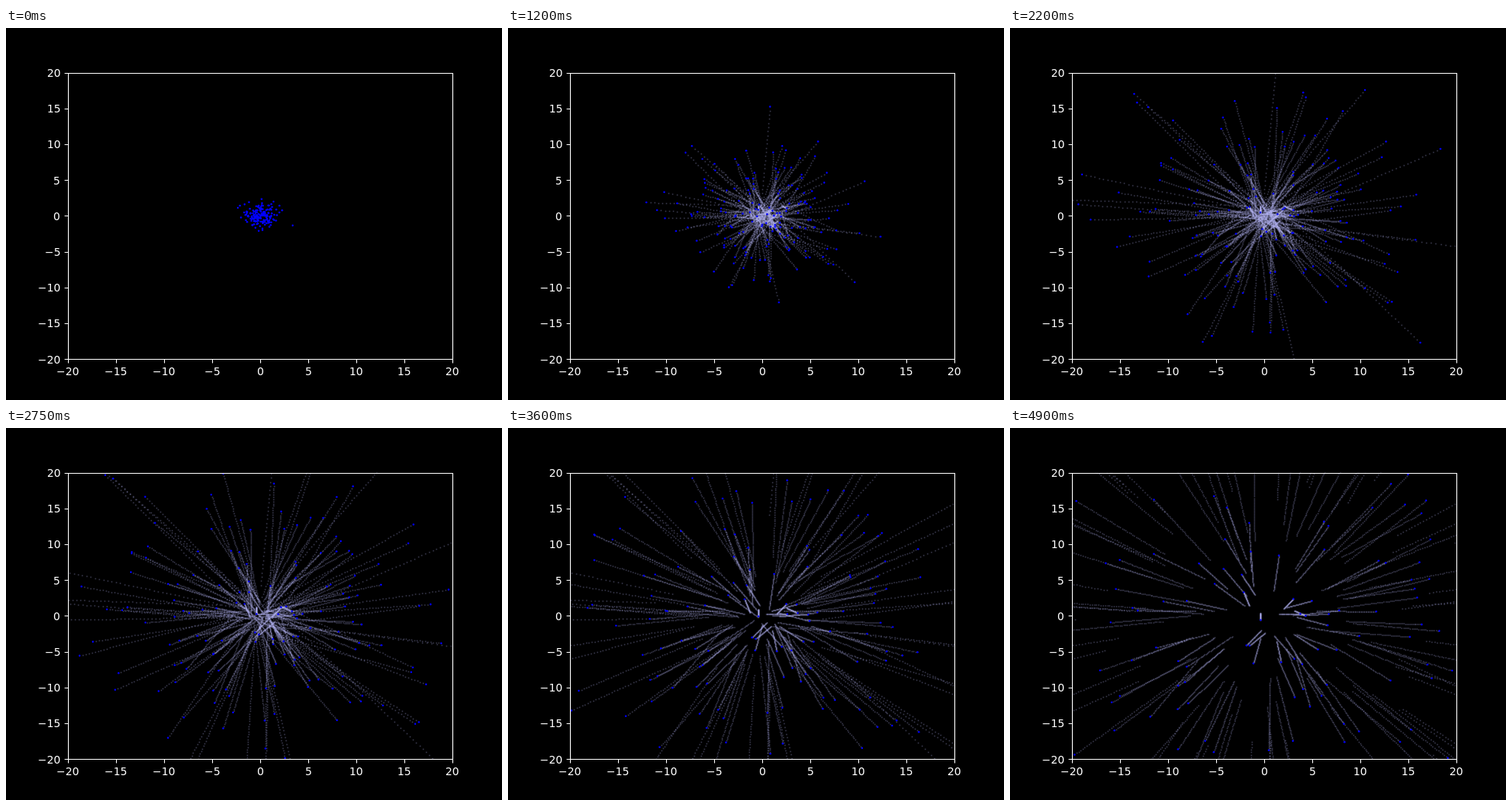
Animation of 640x480 px, one loop 4950 ms. Source, as an HTML page with a canvas:

```html
<!DOCTYPE html>
<html lang="en">
<head>
<meta charset="utf-8">
<title>Expanding particles</title>
<style>
  html, body { margin: 0; height: 100%; overflow: hidden; background: #000; }
  canvas { display: block; }
</style>
</head>
<body>
<canvas id="stage" width="640" height="480"></canvas>
<script>
const ctx = document.getElementById('stage').getContext('2d');
const FRAMES = 99, STEP = 50, TRAIL = 50;
const COUNT = 170, SPEED = 0.18, SPREAD = 0.75;
const LEFT = 80, TOP = 57.6, WIDTH = 496, HEIGHT = 369.6;

// Data coordinates run from -20 to 20 on both axes.
const toX = x => LEFT + (x + 20) / 40 * WIDTH;
const toY = y => TOP + (20 - y) / 40 * HEIGHT;
const snap = v => Math.floor(v + 0.5) + 0.5;

let seed = 7;
function random() {
  seed = (seed * 1664525 + 1013904223) % 4294967296;
  return (seed + 0.5) / 4294967296;
}
function gauss() {
  return Math.sqrt(-2 * Math.log(random())) * Math.cos(2 * Math.PI * random());
}

// Speeds follow evenly spaced quantiles of a two-dimensional normal distribution.
const particles = Array.from({ length: COUNT }, (_, i) => {
  const speed = SPEED * Math.sqrt(-2 * Math.log((i + 1) / (COUNT + 1)));
  const angle = 2 * Math.PI * random();
  const vx = speed * Math.cos(angle), vy = speed * Math.sin(angle);
  return { vx, vy, x: 2 * vx + SPREAD * gauss(), y: 2 * vy + SPREAD * gauss() };
});

function position(p, frame) {
  return [toX(p.x + p.vx * frame), toY(p.y + p.vy * frame)];
}

function drawParticles(frame) {
  ctx.save();
  ctx.beginPath();
  ctx.rect(LEFT, TOP, WIDTH, HEIGHT);
  ctx.clip();
  ctx.fillStyle = 'rgba(190, 190, 255, 0.3)';
  for (const p of particles) {
    for (let n = Math.max(0, frame - TRAIL); n < frame; n++) {
      const [x, y] = position(p, n);
      ctx.fillRect(snap(x) - 0.8, snap(y) - 0.8, 1.6, 1.6);
    }
  }
  ctx.fillStyle = '#00f';
  for (const p of particles) {
    ctx.beginPath();
    ctx.arc(...position(p, frame), 1.25, 0, 2 * Math.PI);
    ctx.fill();
  }
  ctx.restore();
}

// Text starts on a whole pixel; align is the share of its width left of x.
function drawLabel(text, x, baseline, align) {
  const width = ctx.measureText(text).width;
  ctx.fillText(text, Math.round(x - width * align), baseline);
}

function drawAxes() {
  ctx.strokeStyle = ctx.fillStyle = '#fff';
  ctx.lineWidth = 1.11;
  ctx.font = '13.89px "DejaVu Sans", sans-serif';
  ctx.beginPath();
  ctx.rect(80.5, 58.5, 496, 369);
  for (let value = -20; value <= 20; value += 5) {
    const x = toX(value), y = toY(value);
    const label = String(value).replace('-', '\u2212');
    ctx.moveTo(snap(x), 427.5);
    ctx.lineTo(snap(x), 432.4);
    ctx.moveTo(80.5, snap(y));
    ctx.lineTo(75.6, snap(y));
    drawLabel(label, x, 448, 0.5);
    drawLabel(label, 70.3, Math.round(y + 5.3), 1);
  }
  ctx.stroke();
}

let shown = -1;
function render() {
  const frame = Math.floor(performance.now() / STEP) % FRAMES;
  if (frame !== shown) {
    shown = frame;
    ctx.fillStyle = '#000';
    ctx.fillRect(0, 0, 640, 480);
    drawParticles(frame);
    drawAxes();
  }
  requestAnimationFrame(render);
}
render();
</script>
</body>
</html>
```
